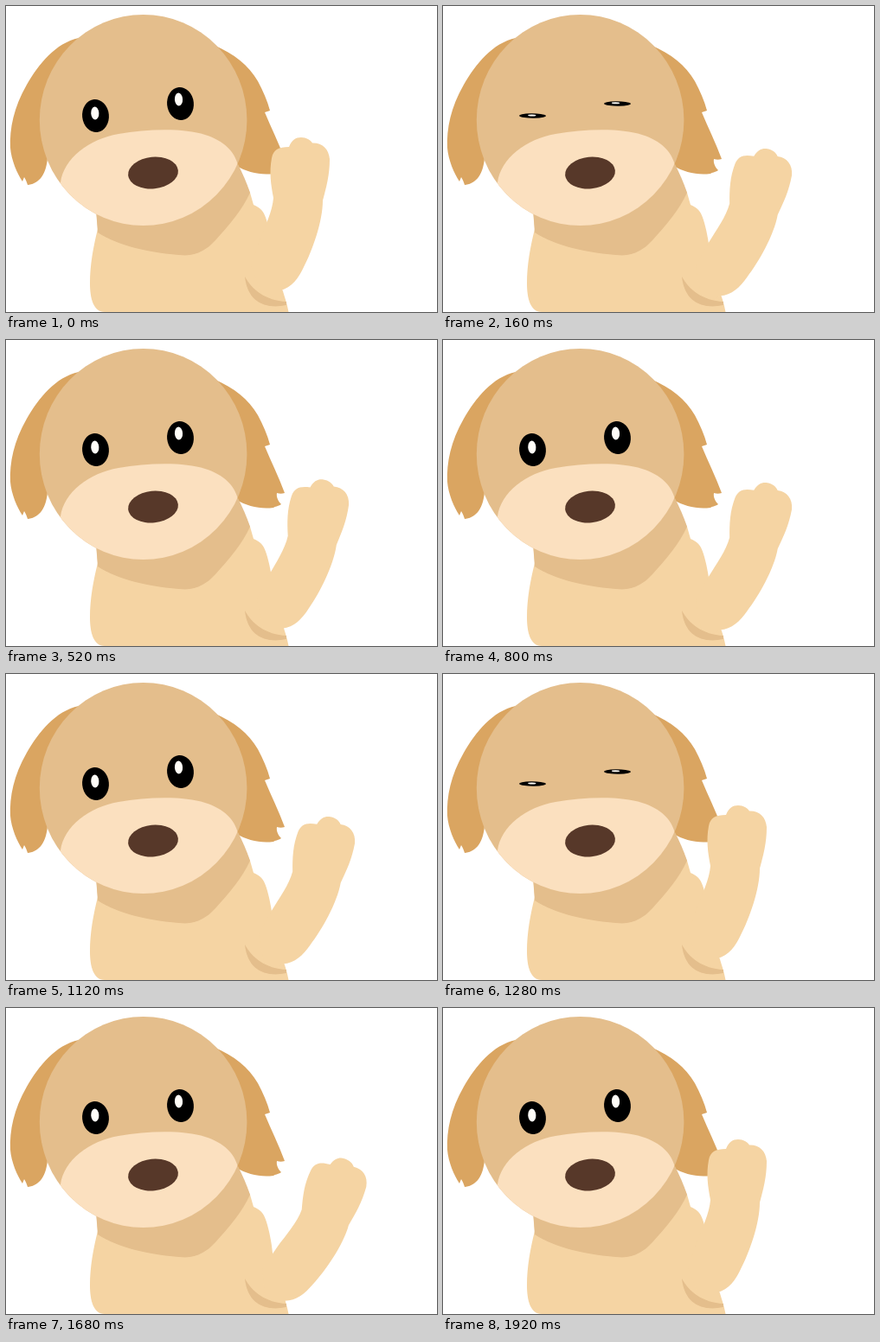
An HTML page with a canvas that plays this animation: 498x354 px, repeating every 1.96 s.

```html
<!DOCTYPE html>
<html lang="en">
<head>
<meta charset="utf-8">
<title>Waving puppy</title>
<style>
  html, body { margin: 0; width: 100%; height: 100%; overflow: hidden; background: #fff; }
  canvas { display: block; }
</style>
</head>
<body>
<canvas id="stage" width="498" height="354"></canvas>
<script>
const ctx = document.getElementById('stage').getContext('2d');

const LOOP = 1960, STEP = 40;
const WAVE = 640, SWING = 20.3 * Math.PI / 180;
const PIVOT = [283, 350];
const BLINKS = [160, 1280], BLINK_HALF = 100, SHUT = 0.14;

const FUR = '#f5d4a3', HEAD = '#e4be8c', EAR = '#daa561', MUZZLE = '#fbe0bf', NOSE = '#573829';

const shapes = {
  leftEar: new Path2D('M84 37C57 43 38 67 24 91C9 117 4 142 5 164C6 178 13 194 19 203L21 198C23 201 24 204 25 207C36 206 46 198 48 176L110 130Z'),
  rightEar: new Path2D('M240 45C264 56 280 68 291 87C297 98 302 110 305 121L299 123C306 140 315 158 322 177C319 178 316 178 313 177C312 182 315 187 318 190C314 193 311 192 309 194C293 196 279 192 266 185L200 130Z'),
  body: new Path2D('M104 235L106 258C101 278 97 299 97 321C97 338 101 354 114 354L326.500 354C325 345 322 337 320 330C314 315 309 295 307 275C305 262 302 248 298 240C295 234 290 232 286 230L282 216L268 184Z'),
  neck: new Path2D('M104 235L106 262C128 277 166 286 207 288.500C222 288 233 281 242 271C258 253 273 236 282 216C278 204 273 193 268 183Z'),
  arm: new Path2D('M283 300L293 271C299 256 308 237 309 222C306 206 304 192 307 176C309 166 315 163 327 163C330 155 335 152 341 152C347 152 352 155 354 158.500C365 158 373 165 374 177C374 196 370 210 366 225C366 249 354 283 344 302C338 315 330 326 317 329L300 345Z'),
  fold: new Path2D('M276 313C284 328 300 341 324 342L324 346C300 351 279 343 276 313Z'),
  muzzle: new Path2D('M63 204C67 176 96 154 130 148C164 142 206 141 230 149C252 156 264 168 268 184L275 270L50 270Z')
};

function fill(path, color) {
  ctx.fillStyle = color;
  ctx.fill(path);
}

function oval(x, y, rx, ry, tilt = 0) {
  const path = new Path2D();
  path.ellipse(x, y, rx, ry, tilt, 0, Math.PI * 2);
  return path;
}

const skull = oval(158.6, 132, 119.8, 122);

function eye(x, y, shineX, shineY, open) {
  ctx.save();
  ctx.translate(x, y);
  ctx.scale(1, open);
  fill(oval(0, 0, 15.4, 19, -0.1), '#000');
  fill(oval(shineX, shineY, 4.6, 7.4, -0.06), '#fffdf8');
  ctx.restore();
}

function armAngle(t) {
  const p = (t % WAVE) / WAVE;
  return SWING * (1 - Math.abs(2 * p - 1));
}

function eyeOpen(t) {
  const gap = Math.min(...BLINKS.map(b => Math.abs(t - b)));
  return SHUT + (1 - SHUT) * Math.min(1, gap / BLINK_HALF);
}

function draw(t) {
  ctx.fillStyle = '#fff';
  ctx.fillRect(0, 0, 498, 354);

  fill(shapes.leftEar, EAR);
  fill(shapes.rightEar, EAR);
  fill(shapes.body, FUR);
  fill(shapes.neck, HEAD);
  fill(skull, HEAD);

  ctx.save();
  ctx.clip(skull);
  fill(shapes.muzzle, MUZZLE);
  ctx.restore();

  fill(oval(170, 193, 29, 18.3, -0.1), NOSE);
  const open = eyeOpen(t);
  eye(103.5, 127, -0.7, -3, open);
  eye(201.5, 113, -2, -5, open);

  ctx.save();
  ctx.translate(...PIVOT);
  ctx.rotate(armAngle(t));
  ctx.translate(-PIVOT[0], -PIVOT[1]);
  fill(shapes.arm, FUR);
  ctx.restore();

  fill(shapes.fold, HEAD);
}

const start = performance.now();
function tick() {
  const t = (performance.now() - start) % LOOP;
  draw(Math.floor(t / STEP) * STEP);
  requestAnimationFrame(tick);
}
tick();
</script>
</body>
</html>
```
